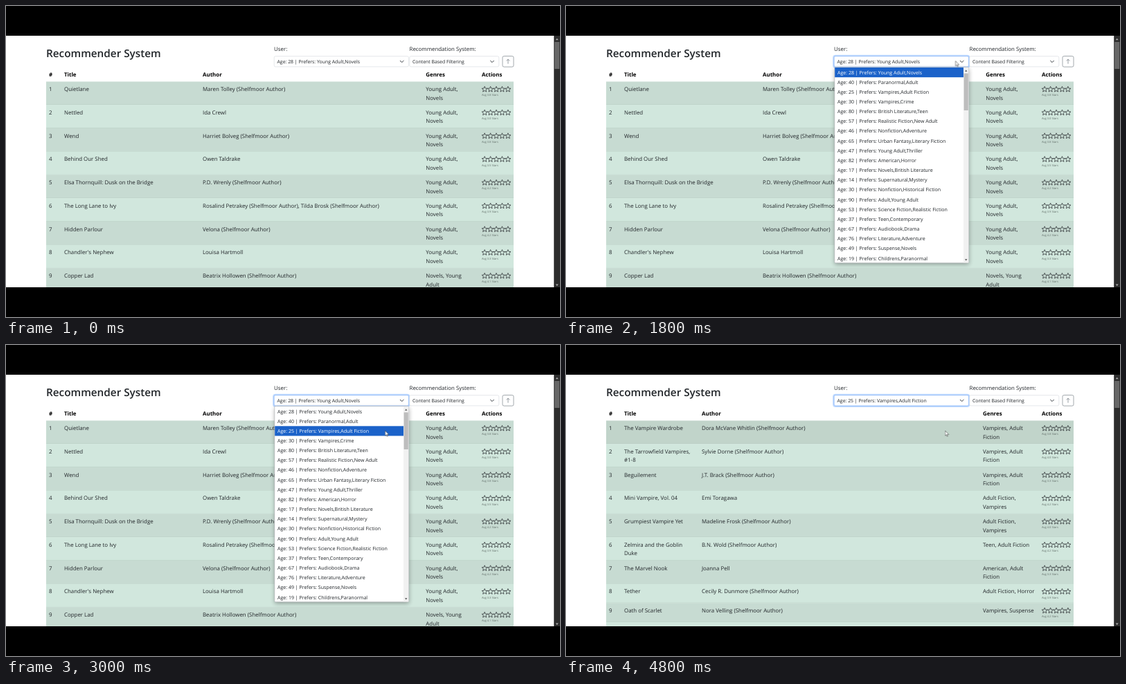
Recreate the animation shown at these times as an HTML page. Size 800 px wide and 450 px high, loop 5 s.

```html
<!DOCTYPE html>
<html lang="en">
<head>
<meta charset="utf-8">
<title>Recommender System</title>
<style>
html, body { margin: 0; width: 100%; height: 100%; overflow: hidden; background: #000; }
svg { display: block; width: 800px; height: 450px; }
text {
  font: 7.9px "Open Sans", "Noto Sans", sans-serif;
  fill: #212529;
  text-rendering: geometricPrecision;
  white-space: pre;
}
text.h1 { font-size: 15.3px; font-weight: 600; }
text.th { font-weight: 700; fill: #000; }
text.field { font-size: 6.9px; }
text.item { font-size: 7.05px; }
text.avg { font-size: 4px; fill: #5f6b66; }
.on text { fill: #fff; }
.box { fill: #fff; stroke: #d3d8dd; stroke-width: .6; }
.icon { fill: none; stroke: #343a40; stroke-linecap: round; stroke-linejoin: round; }

.anim { animation: 5s step-end infinite; }
#before { animation-name: before; }
#after { animation-name: after; }
#menu { animation-name: menu; }
#focus { animation-name: focus; }
#pick0 { animation-name: pick0; }
#pick1 { animation-name: pick1; }
#hi0 { animation-name: hi0; }
#hi1 { animation-name: hi1; }
#hi2 { animation-name: hi2; }
.hover { animation-name: hover; }
#cursor { animation-name: cursor; }
@keyframes before { 0% { opacity: 1 } 88%, 100% { opacity: 0 } }
@keyframes after { 0% { opacity: 0 } 88%, 100% { opacity: 1 } }
@keyframes menu { 0%, 72%, 100% { opacity: 0 } 36% { opacity: 1 } }
@keyframes focus { 0% { opacity: 0 } 36%, 100% { opacity: 1 } }
@keyframes pick0 { 0% { opacity: 1 } 72%, 100% { opacity: 0 } }
@keyframes pick1 { 0% { opacity: 0 } 72%, 100% { opacity: 1 } }
@keyframes hi0 { 0%, 48%, 100% { opacity: 0 } 36% { opacity: 1 } }
@keyframes hi1 { 0%, 56%, 100% { opacity: 0 } 48% { opacity: 1 } }
@keyframes hi2 { 0%, 72%, 100% { opacity: 0 } 56% { opacity: 1 } }
@keyframes hover { 0% { fill: #c7dbd2 } 72%, 100% { fill: #c1d4ca } }
@keyframes cursor {
  0% { transform: translate(569px, 20px) }
  12% { transform: translate(569.5px, 38.5px) }
  16% { transform: translate(571.5px, 55px) }
  20% { transform: translate(572px, 65px) }
  24% { transform: translate(565.5px, 75px) }
  28% { transform: translate(562.5px, 79.5px) }
  44% { transform: translate(562px, 106px) }
  48% { transform: translate(553px, 112px) }
  52% { transform: translate(549.5px, 117px) }
  56% { transform: translate(549px, 124px) }
  60%, 100% { transform: translate(547.5px, 124px) }
}
</style>
</head>
<body>
<svg viewBox="0 0 800 450">
  <defs>
    <clipPath id="page"><rect y="43" width="800" height="364"/></clipPath>
    <filter id="soft" x="-10%" y="-10%" width="120%" height="120%"><feGaussianBlur stdDeviation="3"/></filter>
    <path id="chevron" class="icon" d="M-2.4-1.2 0 1.2 2.4-1.2"/>
    <path id="star" fill="none" stroke="#212529" stroke-width=".7" stroke-linejoin="round"/>
    <g id="stars"></g>
  </defs>
  <rect width="800" height="450"/>
  <g clip-path="url(#page)">
    <rect y="43" width="791.5" height="364" fill="#fff"/>
    <g id="before" class="anim"></g>
    <g id="after" class="anim"></g>

    <text class="h1" x="58" y="74.3">Recommender System</text>
    <text x="387" y="65.2">User:</text>
    <text x="582.5" y="65.2">Recommendation System:</text>

    <rect class="box" x="387.2" y="72.7" width="194.2" height="15.2" rx="2"/>
    <g id="focus" class="anim">
      <rect x="386.2" y="71.7" width="196.2" height="17.2" rx="3" fill="none" stroke="#0d6efd" stroke-opacity=".27" stroke-width="2"/>
      <rect x="387.2" y="72.7" width="194.2" height="15.2" rx="2" fill="#fff" stroke="#86b7fe" stroke-width=".7"/>
    </g>
    <text id="pick0" class="field anim" x="391.5" y="82.9">Age: 28 | Prefers: Young Adult,Novels</text>
    <text id="pick1" class="field anim" x="391.5" y="82.9">Age: 25 | Prefers: Vampires,Adult Fiction</text>
    <use href="#chevron" x="571.7" y="80.4"/>

    <rect class="box" x="582.8" y="72.7" width="129" height="15.2" rx="2"/>
    <text class="field" x="587" y="82.9">Content Based Filtering</text>
    <use href="#chevron" x="702" y="80.4"/>

    <rect x="717" y="72.5" width="16" height="15.6" rx="2.2" fill="#fff" stroke="#7b848c" stroke-width=".7"/>
    <path d="M725 83.3V77.2M722.9 79.2 725 77.1 727.1 79.2" class="icon" style="stroke:#6c757d;stroke-width:.7"/>

    <g id="menu" class="anim">
      <rect x="388" y="91" width="194" height="283" fill="#000" opacity=".32" filter="url(#soft)"/>
      <rect x="387.8" y="88.6" width="193.8" height="283.2" rx="1.5" fill="#fff" stroke="#a9adb1" stroke-width=".6"/>
      <rect x="574" y="89" width="7.3" height="282.4" fill="#f1f1f1"/>
      <rect x="574.6" y="97.5" width="6.2" height="53.5" fill="#bdbdbd"/>
      <path d="M576 94.8 577.7 92.6 579.4 94.8ZM576 366.2 577.7 368.4 579.4 366.2Z" fill="#505050"/>
      <g id="items"></g>
    </g>
    <g id="picks"></g>

    <rect x="791.5" y="43" width="8.5" height="364" fill="#2c2c2c"/>
    <rect x="792.2" y="52" width="7" height="39" fill="#686868"/>
    <path d="M793.7 49.3 795.7 46.7 797.7 49.3ZM793.7 402.6 795.7 405.2 797.7 402.6Z" fill="#a5a5a5"/>

    <g id="cursor" class="anim">
      <path d="M0 0V7.3L1.7 5.8 2.8 8.3 3.9 7.8 2.8 5.4H5.1Z" fill="#fff" stroke="#333" stroke-width=".55" stroke-linejoin="round"/>
    </g>
  </g>
</svg>
<script>
const $ = id => document.getElementById(id);
const text = (x, y, s, cls = '') => `<text x="${x}" y="${y}" class="${cls}">${s}</text>`;
const lines = (x, y, s) => s.split('/').map((t, i) => text(x, y + i * 12.45, t)).join('');

// Rating stars
$('star').setAttribute('d', 'M' + Array.from({ length: 10 }, (_, i) => {
  const r = i % 2 ? 1.9 : 4.3, a = (i / 5 - .5) * Math.PI;
  return `${(r * Math.cos(a)).toFixed(2)} ${(r * Math.sin(a)).toFixed(2)}`;
}).join('L') + 'Z');
$('stars').innerHTML = [0, 1, 2, 3, 4].map(i => `<use href="#star" x="${i * 8.42}"/>`).join('');

// Tables: title ; author (* marks the site's author badge) ; genres ; average
const YN = 'Young Adult,/Novels', VA = 'Vampires, Adult/Fiction', AV = 'Adult Fiction,/Vampires';
const first = [
  `Quietlane;Maren Tolley*;${YN};3.8`,
  `Nettled;Ida Crewl;${YN};3.0`,
  `Wend;Harriet Bolveg*;${YN};3.8`,
  `Behind Our Shed;Owen Taldrake;${YN};3.5`,
  `Elsa Thornquill: Dusk on the Bridge;P.D. Wrenly*;${YN};4.2`,
  `The Long Lane to Ivy;Rosalind Petrakey*, Tilda Brosk*;${YN};3.9`,
  `Hidden Parlour;Velona*;${YN};4.2`,
  `Chandler's Nephew;Louisa Hartmoll;${YN};3.3`,
  'Copper Lad;Beatrix Hollowen*;Novels, Young/Adult;4.1'
];
const second = [
  `The Vampire Wardrobe;Dora McVane Whitlin*;${VA};3.8`,
  `The Tarrowfield Vampires,/#1-8;Sylvie Dorne*;${VA};4.0`,
  `Beguilement;J.T. Brack*;${VA};3.3`,
  `Mini Vampire, Vol. 04;Emi Toragawa;${AV};4.2`,
  `Grumpiest Vampire Yet;Madeline Frosk*;${AV};4.0`,
  'Zelmira and the Goblin/Duke;B.N. Wold*;Teen, Adult Fiction;4.2',
  'The Marvel Nook;Joanna Pell;American, Adult/Fiction;3.3',
  'Tether;Cecily R. Dunmore*;Adult Fiction, Horror;3.9',
  'Oath of Scarlet;Nora Velling*;Vampires, Suspense;4.2',
  ';;;'
];

function table(rows, authorX, genreX) {
  let y = 109.4;
  let out = [[62, '#'], [84, 'Title'], [authorX, 'Author'], [genreX, 'Genres'], [687, 'Actions']]
    .map(([x, s]) => text(x, 102, s, 'th')).join('');
  rows.forEach((row, i) => {
    const [title, author, genres, avg] = row.split(';');
    const h = /\//.test(row) ? 33.75 : 27.6;
    out += `<rect x="58" y="${y}" width="675" height="${h + .1}" fill="${i % 2 ? '#d1e7dd' : '#c7dbd2'}"
      class="${i ? '' : 'anim hover'}"/>
      <rect x="58" y="${y + h - .5}" width="675" height=".52" fill="#b4c9bf"/>`;
    if (title) {
      const base = y + 13.8;
      out += text(62, base, i + 1) + lines(84, base, title) +
        text(authorX, base, author.replace(/\*/g, ' (Shelfmoor Author)')) +
        lines(genreX, base, genres) +
        `<use href="#stars" x="691.2" y="${y + 11.2}"/>` +
        text(687, y + 21, `Avg ${avg} Stars`, 'avg');
    }
    y += h;
  });
  return out;
}
$('before').innerHTML = table(first, 284, 606.3);
$('after').innerHTML = table(second, 196, 602);

// Dropdown
const users = `28 Young Adult,Novels;40 Paranormal,Adult;25 Vampires,Adult Fiction;30 Vampires,Crime;
80 British Literature,Teen;57 Realistic Fiction,New Adult;46 Nonfiction,Adventure;
65 Urban Fantasy,Literary Fiction;47 Young Adult,Thriller;82 American,Horror;
17 Novels,British Literature;14 Supernatural,Mystery;30 Nonfiction,Historical Fiction;
90 Adult,Young Adult;53 Science Fiction,Realistic Fiction;37 Teen,Contemporary;
67 Audiobook,Drama;76 Literature,Adventure;49 Suspense,Novels;19 Childrens,Paranormal`
  .split(';').map(s => s.trim().replace(/^(\d+) /, 'Age: $1 | Prefers: '));
const item = (s, i) => text(392, 98.5 + i * 14.16, s, 'item');
$('items').innerHTML = users.map(item).join('');
$('picks').innerHTML = users.slice(0, 3).map((s, i) =>
  `<g id="hi${i}" class="on anim">
    <rect x="388.2" y="${89 + i * 14.16}" width="185.8" height="14.16" fill="#1b62c9"/>${item(s, i)}</g>`).join('');
</script>
</body>
</html>
```
